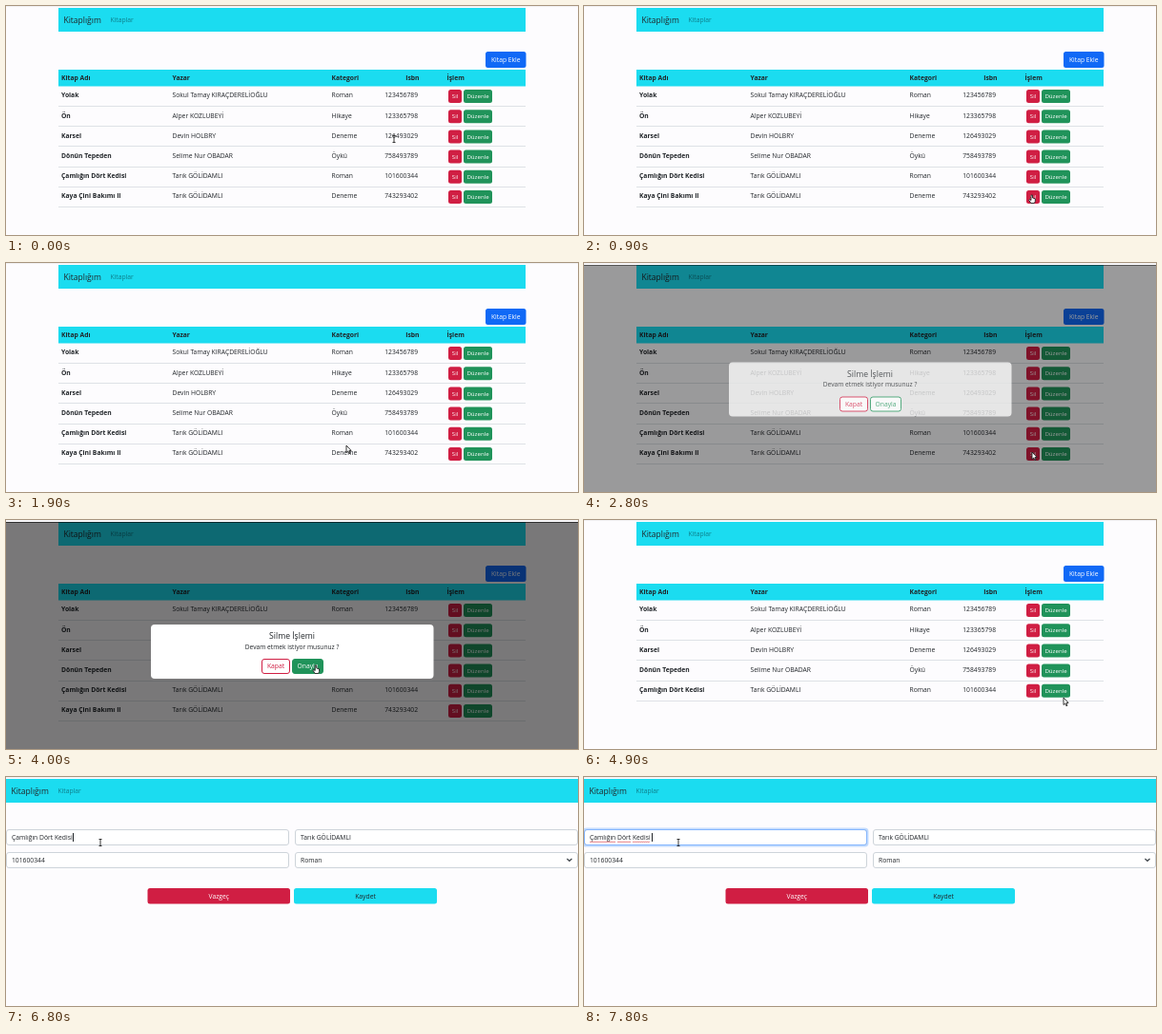
Write an HTML page with a canvas that moves like this. It is 600 px wide and 241 px high and loops after 8 s.

```html
<!DOCTYPE html>
<html lang="tr">
<head>
<meta charset="utf-8">
<title>Kitaplığım</title>
<style>
  html, body { margin: 0; width: 100%; height: 100%; overflow: hidden; background: #fdfcfe; }
  canvas { display: block; width: 600px; height: 241px; }
</style>
</head>
<body>
<canvas id="stage" width="600" height="241"></canvas>
<script>
const ctx = document.getElementById('stage').getContext('2d');
const LOOP = 8000, STEP = 100;
const C = {
  page: '#fdfcfe', cyan: '#1bdcf0', ink: '#212529', line: '#dee2e6',
  red: '#d01e43', green: '#20935a', blue: '#1069f6', field: '#ced4da'
};

const books = [
  ['Yolak', 'Sokul Tamay KIRAÇDERELİOĞLU', 'Roman', '123456789'],
  ['Ön', 'Alper KOZLUBEYİ', 'Hikaye', '123365798'],
  ['Karsel', 'Devin HOLBRY', 'Deneme', '126493029'],
  ['Dönün Tepeden', 'Selime Nur OBADAR', 'Öykü', '758493789'],
  ['Çamlığın Dört Kedisi', 'Tarık GÖLİDAMLI', 'Roman', '101600344'],
  ['Kaya Çini Bakımı II', 'Tarık GÖLİDAMLI', 'Deneme', '743293402']
];

// Pointer path: time, x, y, shape from that moment on
const path = [
  [0, 407, 140, 'beam'], [200, 407, 140, 'arrow'], [700, 469, 199, 'hand'],
  [1000, 470, 199, 'arrow'], [1250, 470, 199, 'arrow'], [1600, 284, 154, 'hand'],
  [1700, 284, 154, 'arrow'], [1900, 357, 192, 'arrow'], [2500, 470, 199, 'hand'],
  [2800, 470, 199, 'arrow'], [3200, 470, 199, 'arrow'], [3800, 325, 153, 'hand'],
  [4250, 325, 153, 'arrow'], [4900, 503, 187, 'arrow'], [5200, 496, 180, 'hand'],
  [5500, 496, 180, 'arrow'], [5800, 490, 178, 'arrow'], [6300, 330, 105, 'arrow'],
  [6500, 200, 78, 'beam'], [6700, 99, 69, 'beam'], [8000, 99, 69, 'beam']
];
const dialogs = [[1000, 1700], [2750, 4200]];

const clamp = v => Math.max(0, Math.min(1, v));

function pointerAt(t) {
  const i = Math.max(0, path.findIndex(p => p[0] > t) - 1);
  const [t0, x0, y0, shape] = path[i], [t1, x1, y1] = path[i + 1];
  const k = (t - t0) / (t1 - t0), e = k * k * (3 - 2 * k);
  return { x: x0 + (x1 - x0) * e, y: y0 + (y1 - y0) * e, shape };
}

function rect(x, y, w, h, color) {
  ctx.fillStyle = color;
  ctx.fillRect(x, y, w, h);
}

function box(x, y, w, h, r, fill, stroke) {
  ctx.beginPath();
  ctx.roundRect(x, y, w, h, r);
  if (fill) { ctx.fillStyle = fill; ctx.fill(); }
  if (stroke) { ctx.strokeStyle = stroke; ctx.lineWidth = 1; ctx.stroke(); }
}

function text(s, x, y, { size = 6.75, weight = 400, color = C.ink, align = 'left' } = {}) {
  ctx.font = `${weight} ${size}px "Open Sans", "Noto Sans", sans-serif`;
  ctx.textAlign = align;
  ctx.textBaseline = 'alphabetic';
  ctx.fillStyle = color;
  ctx.fillText(s, x, y + size * 0.36);
  return ctx.measureText(s).width;
}

function button(label, x, y, w, h, fill, color = '#fff', size = 6.75, stroke) {
  box(x, y, w, h, 2.5, fill, stroke);
  text(label, x + w / 2, y + h / 2, { size, color, align: 'center' });
}

function navbar(x, w) {
  rect(x, 2, w, 25, C.cyan);
  text('Kitaplığım', x + 5.5, 15, { size: 8.5 });
  text('Kitaplar', x + 54.5, 15, { color: '#0e7d89' });
}

function listPage(count) {
  navbar(55, 490);
  button('Kitap Ekle', 503, 48, 42.5, 17, C.blue);
  rect(55, 67, 490, 17.5, C.cyan);
  const bold = { weight: 700 };
  text('Kitap Adı', 58, 75.5, bold);
  text('Yazar', 174.5, 75.5, bold);
  text('Kategori', 341.5, 75.5, bold);
  text('Isbn', 433.5, 75.5, { weight: 700, align: 'right' });
  text('İşlem', 462.5, 75.5, bold);
  books.slice(0, count).forEach(([name, author, kind, isbn], i) => {
    const y = 94 + i * 21.2;
    text(name, 58, y, bold);
    text(author, 174.5, y);
    text(kind, 341.5, y);
    text(isbn, 432, y, { align: 'right' });
    button('Sil', 464, y - 6, 14, 14, C.red, '#fff', 6.1);
    button('Düzenle', 480, y - 6, 30, 14, C.green, '#fff', 6.1);
    rect(55, Math.round(y + 11), 490, 1, C.line);
  });
}

function dialog(p, mouse) {
  ctx.globalAlpha = p;
  rect(0, 2, 600, 239, 'rgba(0,0,0,.52)');
  rect(0, 2, 600, 1, 'rgba(0,0,0,.6)');
  ctx.save();
  ctx.translate(0, -22 * (1 - p));
  box(152, 110, 296.5, 57, 4, '#fff');
  text('Silme İşlemi', 300, 122, { size: 8.6, weight: 500, align: 'center' });
  text('Devam etmek istiyor musunuz ?', 300, 133.3, { size: 6.65, align: 'center' });
  const choice = (label, x, w, color) => {
    const hot = mouse.shape === 'hand' && mouse.x > x && mouse.x < x + w && mouse.y > 146 && mouse.y < 162;
    button(label, x + 0.5, 146.5, w - 1, 15, hot ? color : '#fff', hot ? '#fff' : color, 6.75, color);
  };
  choice('Kapat', 268, 30, C.red);
  choice('Onayla', 300, 33, C.green);
  ctx.restore();
  ctx.globalAlpha = 1;
}

function field(value, x, y, w) {
  box(x + 0.5, y + 0.5, w - 1, 16, 2.5, '#fff', C.field);
  return text(value, x + 6, y + 8.7);
}

function editPage(t) {
  navbar(0, 600);
  const title = books[4][0];
  const ring = clamp((t - 6800) / 200);
  if (ring) {
    ctx.globalAlpha = ring;
    box(-1.5, 53.5, 300, 20, 4, '#c2dbfe');
    ctx.globalAlpha = 1;
  }
  field('', 0, 55, 297);
  if (ring) box(0.5, 55.5, 296, 16, 2.5, null, `rgba(134,183,254,${ring})`);
  const typed = title + (t >= 7300 ? ' ' : '');
  const end = 6 + text(typed, 6, 63.7);
  if (ring) underline(title, 6, 68.2);
  if (t >= 6700) rect(Math.round(end), 59, 1, 9, C.ink);

  field(books[4][1], 303, 55, 297);
  field(books[4][3], 0, 79, 297);
  field(books[4][2], 303, 79, 297);
  ctx.beginPath();
  ctx.moveTo(588.5, 86);
  ctx.lineTo(591, 88.5);
  ctx.lineTo(593.5, 86);
  ctx.strokeStyle = '#343a40';
  ctx.lineWidth = 1.1;
  ctx.stroke();
  button('Vazgeç', 148.5, 117, 149.5, 16.5, C.red);
  button('Kaydet', 302, 117, 150, 16.5, C.cyan, C.ink);
}

function underline(s, x, y) {
  const gap = ctx.measureText(' ').width;
  ctx.strokeStyle = '#e0474c';
  ctx.lineWidth = 0.7;
  for (const word of s.split(' ')) {
    const w = ctx.measureText(word).width;
    ctx.beginPath();
    for (let d = 0; d <= w; d++) ctx.lineTo(x + d, y + (d % 2 ? 0.5 : -0.3));
    ctx.stroke();
    x += w + gap;
  }
}

function pointer({ x, y, shape }) {
  ctx.save();
  ctx.translate(x, y);
  ctx.lineJoin = 'round';
  ctx.strokeStyle = '#222';
  ctx.lineWidth = 0.9;
  ctx.beginPath();
  if (shape === 'beam') {
    ctx.moveTo(-1.5, -3.5); ctx.lineTo(1.5, -3.5);
    ctx.moveTo(0, -3.5); ctx.lineTo(0, 3.5);
    ctx.moveTo(-1.5, 3.5); ctx.lineTo(1.5, 3.5);
    ctx.stroke();
  } else {
    const points = shape === 'hand'
      ? [[-.7, 0], [.7, 0], [.8, 3], [3.5, 3.7], [3.6, 6.5], [2.7, 8.5], [-1, 8.5], [-3, 5.2], [-2.2, 4.5], [-.8, 5.5]]
      : [[0, 0], [0, 7.5], [1.7, 6], [2.9, 8.7], [4, 8.2], [2.9, 5.6], [5.1, 5.4]];
    points.forEach(p => ctx.lineTo(...p));
    ctx.closePath();
    ctx.fillStyle = '#fff';
    ctx.fill();
    ctx.stroke();
  }
  ctx.restore();
}

function draw(t) {
  const mouse = pointerAt(t);
  rect(0, 0, 600, 241, C.page);
  rect(0, 0, 600, 1, '#f0eff1');
  if (t < 5500) listPage(t < 4500 ? 6 : 5);
  else editPage(t);
  for (const [open, close] of dialogs) {
    const p = Math.min(clamp((t - open + 100) / 200), clamp((close + 200 - t) / 200));
    if (p > 0) dialog(p, mouse);
  }
  pointer(mouse);
}

function frame(now) {
  draw(Math.floor((now % LOOP) / STEP) * STEP);
  requestAnimationFrame(frame);
}
requestAnimationFrame(frame);
</script>
</body>
</html>
```
